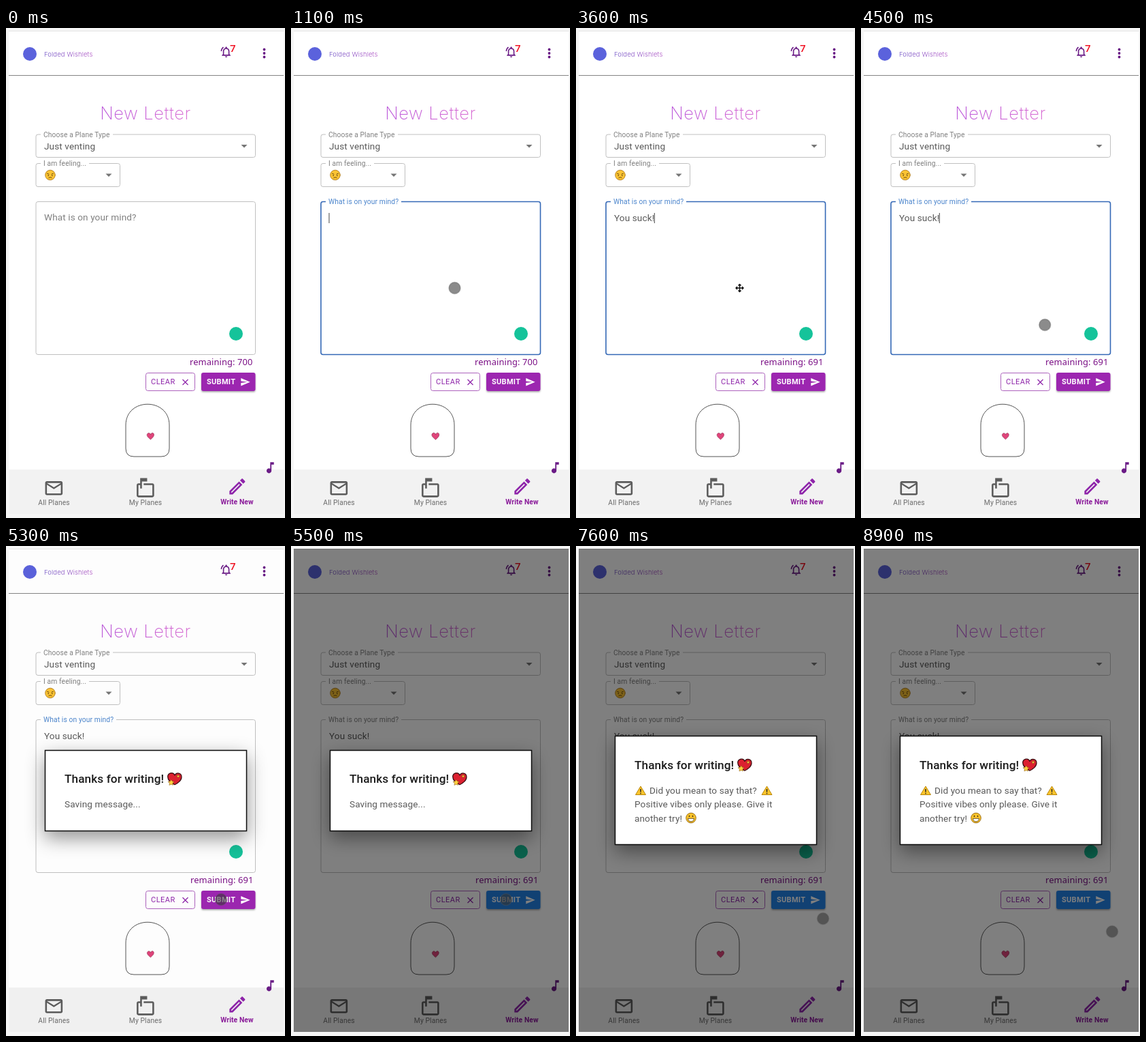
An HTML page for the animation above (9000 ms loop, 410 by 718 pixels).

```html
<!DOCTYPE html>
<html lang="en">
<head>
<meta charset="utf-8">
<title>New Letter</title>
<style>
  html, body { margin: 0; width: 100%; height: 100%; overflow: hidden; background: #f6f6f6; }
  svg { display: block; width: 410px; height: 718px; }
  text { font-family: Roboto, sans-serif; font-size: 13.6px; letter-spacing: .1px; fill: #5a5a5a; white-space: pre; }
  .label { font-size: 10.3px; fill: #808080; }
  .nav { font-size: 10.3px; text-anchor: middle; fill: #6c6c6c; }
  .field { fill: none; stroke: #c0c0c0; }
  .button { font-size: 11px; letter-spacing: .5px; }
  .title { font-size: 17.2px; font-weight: 450; fill: #1c1c1c; }
</style>
</head>
<body>
<svg viewBox="0 0 410 718">
  <defs>
    <linearGradient id="heading"><stop stop-color="#bb58da"/><stop offset="1" stop-color="#d86ad2"/></linearGradient>
    <linearGradient id="brand"><stop stop-color="#6c4fc4"/><stop offset="1" stop-color="#b052c4"/></linearGradient>
    <filter id="dialogShadow" x="-30%" y="-50%" width="160%" height="220%">
      <feDropShadow dx="0" dy="10" stdDeviation="14" flood-opacity=".42"/>
    </filter>
    <filter id="buttonShadow" x="-20%" y="-30%" width="140%" height="180%">
      <feDropShadow dx="0" dy="1.5" stdDeviation="1.3" flood-opacity=".35"/>
    </filter>
    <path id="arrow" d="M-4.5-2h9L0 2.5z" fill="#757575"/>
    <g id="gift" stroke-linejoin="round" transform="scale(1.25)">
      <path d="M0 7C-6 4-9 0-8-4-6-8-1-7 0-4 2-8 8-7 8-2 8 2 4 5 0 7Z" fill="#dc2030" stroke="#3a0c10"/>
      <path d="M-4 1l1 2 2.500.5-2 1.500.5 2.500-2-1-2.500 1 .5-2.500-2-1.500 2.500-.5zM4-5l.7 1.500 1.500.5-1.500.7-.7 1.500-.7-1.500-1.500-.7 1.500-.5z" fill="#ffd23f" stroke="#7a4a10" stroke-width=".4"/>
    </g>
    <g id="warning">
      <path d="M0-6.500L7.500 6h-15z" fill="#fcc52c" stroke="#b8860b" stroke-linejoin="round"/>
      <path d="M0-2.500v4.500M0 3.300v1.500" stroke="#222" stroke-width="1.500"/>
    </g>
  </defs>

  <rect x="4" y="4" width="404" height="708" fill="#fff"/>
  <path d="M4 4.500h404" stroke="#e4e4e4"/>
  <path d="M4 69.500h404" stroke="#858585"/>
  <circle cx="35" cy="38" r="10" fill="#5b62dc"/>
  <text x="56" y="42" style="font:300 9.500px Inter,sans-serif;fill:url(#brand)">Folded Wishlets</text>

  <g fill="#6a1b86">
    <path transform="translate(314 25.500) scale(.8)" d="M12 22c1.100 0 2-.9 2-2h-4c0 1.100.9 2 2 2zm6-6v-5c0-3.070-1.630-5.640-4.500-6.320V4c0-.83-.67-1.500-1.500-1.500s-1.500.67-1.500 1.500v.68C7.640 5.360 6 7.920 6 11v5l-2 2v1h16v-1l-2-2zm-2 1H8v-6c0-2.480 1.510-4.500 4-4.500s4 2.020 4 4.500v6zM7.580 4.080 6.150 2.650C3.750 4.480 2.170 7.300 2.030 10.500h2c.15-2.650 1.510-4.970 3.550-6.420z"/>
    <circle cx="379.500" cy="31.500" r="1.900"/><circle cx="379.500" cy="37" r="1.900"/><circle cx="379.500" cy="42.500" r="1.900"/>
  </g>
  <text x="329" y="34.500" style="font:600 15px 'Open Sans',sans-serif;fill:#f01020">7</text>
  <text x="205" y="133.500" text-anchor="middle" style="font:200 25.500px Inter,sans-serif;letter-spacing:.6px;fill:url(#heading)">New Letter</text>

  <rect class="field" x="44" y="156" width="322.500" height="33.500" rx="3"/>
  <path d="M51 156h106" stroke="#fff" stroke-width="3"/>
  <text class="label" x="55" y="159.500">Choose a Plane Type</text>
  <text x="56" y="178">Just venting</text>
  <use href="#arrow" x="350" y="173"/>

  <rect class="field" x="44" y="198.500" width="123.500" height="34" rx="3"/>
  <path d="M51 198.500h71" stroke="#fff" stroke-width="3"/>
  <text class="label" x="55" y="202">I am feeling...</text>
  <use href="#arrow" x="151" y="215.500"/>
  <g transform="translate(65 215.500)" fill="none" stroke="#6b4a14" stroke-linecap="round">
    <circle r="7.300" fill="#fcc433" stroke="#b8852a"/>
    <path d="M-4.500-2.300l2.500 1M4.500-2.300l-2.500 1M-2.200 4q2.200-1.800 4.400 0"/>
    <path d="M-2.800.6v.3M2.800.6v.3" stroke-width="1.500"/>
  </g>

  <rect id="area" class="field" x="44" y="254.500" width="322.500" height="224" rx="3"/>
  <path id="notch" d="M51 254.500h111" stroke="#fff" stroke-width="4"/>
  <text id="prompt">What is on your mind?</text>
  <text id="message" x="56" y="283"></text>
  <path id="caret" stroke="#444"/>
  <circle cx="338" cy="448" r="10" fill="#15c39a"/>
  <text id="remaining" y="493.500" text-anchor="end" style="font:12.900px 'Noto Sans',sans-serif;fill:#7b1086"></text>

  <rect x="205.500" y="505.500" width="72" height="26" rx="3" fill="#fff" stroke="#ad62bd"/>
  <text class="button" x="213" y="522" style="fill:#8e24aa">CLEAR</text>
  <path d="M259.500 515l8 8m0-8l-8 8" stroke="#8e24aa" stroke-width="1.200"/>
  <rect id="submit" x="287" y="505" width="79.500" height="27" rx="3" filter="url(#buttonShadow)"/>
  <text class="button" x="295" y="522" style="fill:#fff;font-weight:700;letter-spacing:.3px">SUBMIT</text>
  <path transform="translate(344 511) scale(.64)" d="M2.010 21 23 12 2.010 3 2 10l15 2-15 2z" fill="#fff"/>

  <path d="M176 616V582C176 541 240 541 240 582V616Q240 628 228 628H188Q176 628 176 616Z" fill="#fff" stroke="#555"/>
  <path id="heart" d="M0 5C-5 1-6-1-5-3-3-6 0-4 0-2 1-6 5-5 5-2 5 1 2 3 0 5Z" fill="#e0457b" stroke="#8a3050" stroke-width=".6"/>

  <rect x="4" y="647" width="404" height="65" fill="#f2f2f2"/>
  <g fill="#5c5c5c">
    <path transform="translate(55 659) scale(1.280)" d="M22 6c0-1.100-.9-2-2-2H4c-1.100 0-2 .9-2 2v12c0 1.100.9 2 2 2h16c1.100 0 2-.9 2-2V6zm-2 0-8 5-8-5h16zm0 12H4V8l8 5 8-5v10z"/>
    <path transform="translate(189.500 659.500) scale(1.280)" d="M20 6H10v2h10v12H4V8h2v4h2V4h6V0H6v6H4c-1.100 0-2 .9-2 2v12c0 1.100.9 2 2 2h16c1.100 0 2-.9 2-2V8c0-1.100-.9-2-2-2z"/>
    <path transform="translate(324.500 656.500) scale(1.280)" fill="#8e24aa" d="M14.060 9.020l.92.92L5.920 19H5v-.92l9.060-9.060M17.660 3c-.25 0-.51.1-.7.29l-1.830 1.830 3.750 3.750 1.830-1.830c.39-.39.39-1.020 0-1.410l-2.340-2.340c-.2-.2-.45-.29-.71-.29zm-3.600 3.190L3 17.250V21h3.750L17.810 9.940l-3.750-3.750z"/>
  </g>
  <text class="nav" x="70.500" y="698.800">All Planes</text>
  <text class="nav" x="205" y="698.800">My Planes</text>
  <text class="nav" x="339.500" y="698" style="fill:#8a1a9a;font-weight:600">Write New</text>
  <path transform="translate(377.500 633.500) scale(.9)" fill="#6a1b86" d="M12 3v10.550c-.59-.34-1.270-.55-2-.55-2.210 0-4 1.790-4 4s1.790 4 4 4 4-1.790 4-4V7h4V3h-6z"/>

  <rect id="backdrop" x="4" y="4" width="404" height="708"/>

  <g id="dialog">
    <rect id="panel" x="57.500" width="296" fill="#fff" stroke="#111" stroke-width="1.500" filter="url(#dialogShadow)"/>
    <g id="dialogTitle">
      <text class="title" x="86" y="6">Thanks for writing!</text>
      <use href="#gift" x="248"/>
    </g>
    <text id="saving" x="86" y="383">Saving message...</text>
    <g id="advice">
      <use href="#warning" x="95" y="358.500"/>
      <text x="108" y="362.500">Did you mean to say that?</text>
      <use href="#warning" x="280.500" y="358.500"/>
      <text x="86" y="383">Positive vibes only please. Give it</text>
      <text x="86" y="403.500">another try!</text>
      <g transform="translate(169 398.500)">
        <circle r="7.300" fill="#fcc52c" stroke="#9a6c14"/>
        <path d="M-4.500.8h9q-.5 4.500-4.500 4.500T-4.500.8" fill="#fff" stroke="#4a3510" stroke-width=".8"/>
        <path d="M-2.500-3.800v2.300M2.500-3.800v2.300" stroke="#4a3510" stroke-width="1.500"/>
      </g>
    </g>
  </g>

  <circle id="dot" r="8.500" fill="#333" fill-opacity=".57" stroke="#555" stroke-opacity=".35" stroke-width="1.500"/>
  <path id="mover" d="M-5 0H5M0-5V5M-3.500-2L-5.500 0l2 2M3.500-2L5.500 0l-2 2M-2-3.500L0-5.500l2 2M-2 3.500L0 5.500l2-2" fill="none" stroke="#111" stroke-width="1.500" stroke-linejoin="round"/>
</svg>
<script>
const LOOP = 9000, STEP = 100;
const FOCUS = 700, BLUR = 5200, OPEN = 5200, REPLY = 6400;
const MESSAGE = "You suck!";
const KEY_TIMES = [2000, 2200, 2400, 2700, 2900, 3100, 3200, 3400, 3500];
const CURSOR = [[300, 252, 440], [700, 240.5, 381], [4200, 240.5, 381], [4900, 316, 518],
                [5600, 316, 518], [6500, 363, 546], [8100, 363, 546], [8700, 369, 565]];

const el = {};
document.querySelectorAll("svg [id]").forEach(node => el[node.id] = node);

const set = (node, attrs) => {
  for (const name in attrs) node.setAttribute(name, attrs[name]);
};
const show = (node, visible) => { node.style.display = visible ? "" : "none"; };
const mix = (a, b, p) => a + (b - a) * p;
const progress = (t, start, length) => Math.min(1, Math.max(0, (t - start) / length));
const ease = p => p * p * (3 - 2 * p);

function along(path, t) {
  const next = path.findIndex(([time]) => time > t);
  if (next < 0) return path.at(-1).slice(1);
  if (next === 0) return path[0].slice(1);
  const [t0, x0, y0] = path[next - 1], [t1, x1, y1] = path[next];
  const p = ease((t - t0) / (t1 - t0));
  return [mix(x0, x1, p), mix(y0, y1, p)];
}

function drawInput(t) {
  const focused = t >= FOCUS && t < BLUR;
  const shrink = ease(progress(t, FOCUS, 200));
  const typed = KEY_TIMES.filter(time => time <= t).length;
  const lastKey = typed ? KEY_TIMES[typed - 1] : FOCUS;

  el.area.style.stroke = focused ? "#3468b6" : "";
  el.area.style.strokeWidth = focused ? 1.6 : 1;
  show(el.notch, t >= FOCUS);
  set(el.prompt, { x: mix(56, 55, shrink), y: mix(282, 257.8, shrink) });
  el.prompt.style.fontSize = mix(13.6, 10.3, shrink) + "px";
  el.prompt.style.fill = t >= FOCUS && t < 5400 ? "#4a84cc" : "#808080";

  el.message.textContent = MESSAGE.slice(0, typed);
  const x = 56 + (typed ? el.message.getComputedTextLength() : 0);
  set(el.caret, { d: `M${x} 271v15` });
  show(el.caret, focused && (t - lastKey) % 1000 < 500);

  el.remaining.textContent = "remaining: " + (700 - typed);
  set(el.remaining, { x: typed > 3 ? 363.5 : 362.5 });
}

function drawDialog(t) {
  const replied = t >= REPLY;
  const [top, height, titleY] = replied ? [278.5, 159, 320.5] : [299.5, 118, 341];
  show(el.dialog, t >= OPEN);
  set(el.dialog, { opacity: t < OPEN + STEP ? .6 : 1 });
  set(el.panel, { y: top, height });
  set(el.dialogTitle, { transform: `translate(0 ${titleY})` });
  show(el.saving, !replied);
  show(el.advice, replied);

  const dim = t <= OPEN ? 0 : t < 5400 ? .006 : t < 5500 ? .35 : .5;
  set(el.backdrop, { opacity: dim });
  set(el.submit, { fill: t < 5400 ? "#9c27b0" : "#2484e8" });
}

function drawCursor(t) {
  const [x, y] = along(CURSOR, t);
  const moving = t >= 3200 && t < 4200;
  const place = { transform: `translate(${x} ${y})` };
  set(el.dot, place);
  set(el.mover, place);
  show(el.dot, t >= 300 && !moving);
  show(el.mover, moving);
}

function draw(time) {
  const t = Math.floor(time % LOOP / STEP) * STEP;
  drawInput(t);
  drawDialog(t);
  drawCursor(t);
  const beat = 1 + .06 * Math.sin(t / 400 * Math.PI);
  set(el.heart, { transform: `translate(212.500 598) scale(${beat})` });
}

const start = performance.now();
function tick() {
  draw(performance.now() - start);
  requestAnimationFrame(tick);
}
tick();
</script>
</body>
</html>
```
